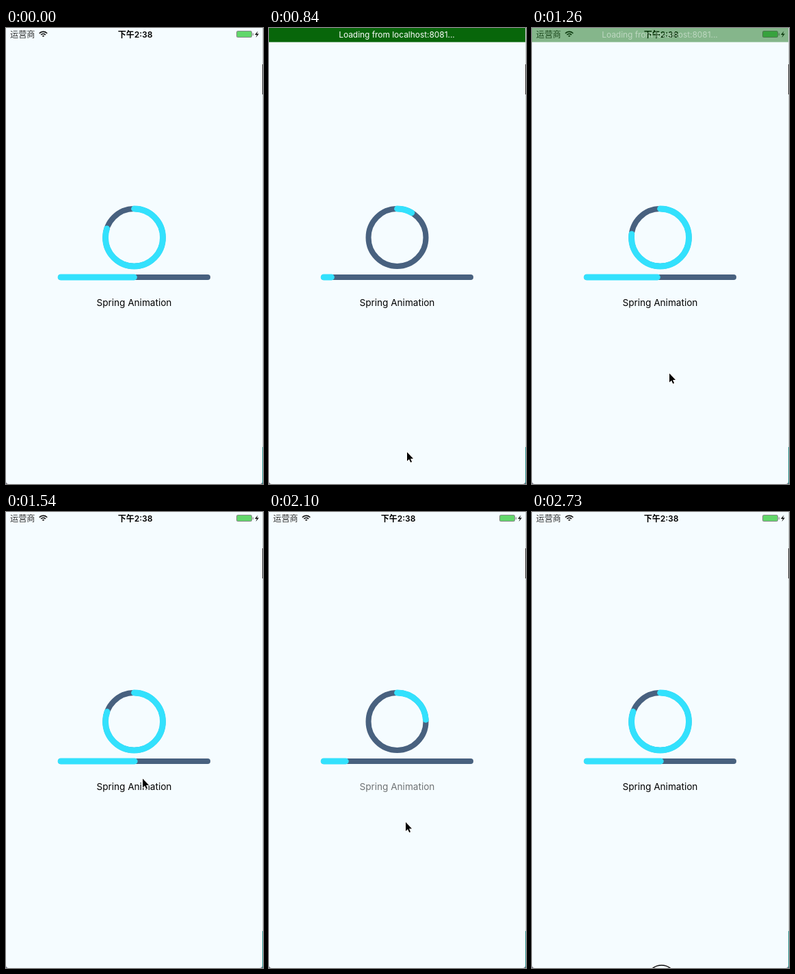
An HTML page with a canvas that plays this animation: 376 by 666 pixels, repeating every 2.8 s.

```html
<!DOCTYPE html>
<html lang="zh">
<head>
<meta charset="utf-8">
<style>
html, body { margin: 0; width: 376px; height: 666px; overflow: hidden; }
canvas { display: block; }
</style>
</head>
<body>
<canvas id="stage" width="376" height="666"></canvas>
<script>
const ctx = document.getElementById('stage').getContext('2d');
const LOOP = 2800, STEP = 70, TAU = 2 * Math.PI;
const RELOAD = 560, MOUNT = 807, REPLAY = 2040;
const FONT = 'Inter, "Noto Sans CJK SC", "Noto Sans CJK", sans-serif';
const TRACK = '#48617f', CYAN = '#33e1fd';
const ARROW = new Path2D('M0 0V13L3 10.2L5.2 15L7 14.2L5 9.4H9Z');
const BOLT = new Path2D('M368.5 4.5L364 10H367L365.5 14L370 8.5H367Z');

const ramp = (t, a, b) => Math.min(1, Math.max(0, (t - a) / (b - a)));
const smooth = p => p * p * (3 - 2 * p);
const easeOut = p => 1 - (1 - p) ** 2;

// Underdamped spring from 0 to 1
function spring(ms) {
  const s = Math.max(0, ms) / 1000, decay = 7, w = 13.5;
  return 1 - Math.exp(-decay * s) * (Math.cos(w * s) + decay / w * Math.sin(w * s));
}

function progress(t) {
  if (t < RELOAD) return 1;
  return spring(t - (t < REPLAY ? MOUNT : REPLAY));
}

function rect(x, y, w, h, color) {
  ctx.fillStyle = color;
  ctx.fillRect(x, y, w, h);
}

function box(x, y, w, h, radii, color) {
  ctx.fillStyle = color;
  ctx.beginPath();
  ctx.roundRect(x, y, w, h, radii);
  ctx.fill();
}

function text(str, x, y, style, color, align = 'center') {
  ctx.font = `${style} ${FONT}`;
  ctx.textAlign = align;
  ctx.fillStyle = color;
  ctx.fillText(str, x, y);
}

function arc(x, y, r, from, to, width, color) {
  ctx.strokeStyle = color;
  ctx.lineWidth = width;
  ctx.beginPath();
  ctx.arc(x, y, r, from, to);
  ctx.stroke();
}

function statusBar() {
  text('运营商', 6, 13.7, '12.2px', '#333', 'left');
  text('下午2:38', 189, 13.7, '600 12px', '#000');
  ctx.lineCap = 'butt';
  for (const r of [1.5, 4.6, 7.8])
    arc(54.5, 13.2, r, -TAU * .38, -TAU * .12, 1.6, '#111');

  box(337, 4, 23, 10, 2.5, '#858a88');
  box(338, 5, 21, 8, 1.5, '#62d76b');
  rect(360.8, 7.5, 1.2, 3.5, '#858a88');
  ctx.fillStyle = '#111';
  ctx.fill(BOLT);
}

// Ring and bar share one colour and one amount
function gauges(amount, color, width) {
  ctx.lineCap = 'round';
  arc(187.5, 306, 42, -TAU / 4, TAU * (amount.ring - .25), width, color);
  ctx.beginPath();
  ctx.moveTo(80, 364);
  ctx.lineTo(80 + 215 * amount.bar, 364);
  ctx.stroke();
}

function content(t) {
  const v = progress(t);
  gauges({ ring: 1, bar: 1 }, TRACK, 8);
  gauges({ ring: v * .8, bar: v * .5 }, CYAN, 8.8);

  const pressed = ramp(t, 1850, 1960) - ramp(t, 2030, 2190);
  ctx.globalAlpha = 1 - .8 * pressed;
  text('Spring Animation', 187.4, 405.6, '13.6px', '#000');
  ctx.globalAlpha = 1;
}

function banner(t) {
  if (t < RELOAD) return;
  ctx.globalAlpha = 1 - smooth(ramp(t, 1130, 1380));
  rect(0, 0, 375, 20.6, '#08660a');
  text('Loading from localhost:8081...', 187, 14.1, '11.9px', '#fff');
  ctx.globalAlpha = 1;
}

function rightEdge() {
  rect(375, 0, 1, 666, '#cdd3d5');
  rect(375, 53, 1, 44, '#333');
  rect(375, 612, 1, 54, '#2f9490');
}

// Enters from below, rises to the label, clicks, and leaves downwards
function cursor(t) {
  const leave = easeOut(ramp(t, 2030, 2735));
  const x = 189 + 13 * smooth(ramp(t, 70, 350)) - 2 * smooth(ramp(t, 1120, 1400))
    - 11 * smooth(ramp(t, 2400, 2640));
  const y = 690 - 70.5 * smooth(ramp(t, 70, 350)) - 230 * smooth(ramp(t, 1120, 1400))
    + 10 * smooth(ramp(t, 1560, 1890)) + 284 * leave;
  if ((t >= 1890 && t < 2030) || t >= 2700) arc(x + .5, y, 21.5, 0, TAU, 1.5, '#111');

  ctx.save();
  ctx.translate(x, y);
  ctx.lineJoin = 'round';
  ctx.lineWidth = 1.6;
  ctx.strokeStyle = '#fff';
  ctx.stroke(ARROW);
  ctx.fillStyle = '#000';
  ctx.fill(ARROW);
  ctx.restore();
}

function draw(t) {
  const blank = t >= RELOAD && t < MOUNT;
  rect(0, 0, 376, 666, '#667');
  box(0, 0, 375, 666, [0, 0, 4, 4], blank ? '#fff' : '#f5fcff');
  statusBar();
  if (!blank) content(t);
  banner(t);
  rightEdge();
  cursor(t);
}

const start = performance.now();
function tick() {
  const t = (performance.now() - start) % LOOP;
  draw(Math.floor(t / STEP) * STEP);
  requestAnimationFrame(tick);
}
tick();
</script>
</body>
</html>
```
